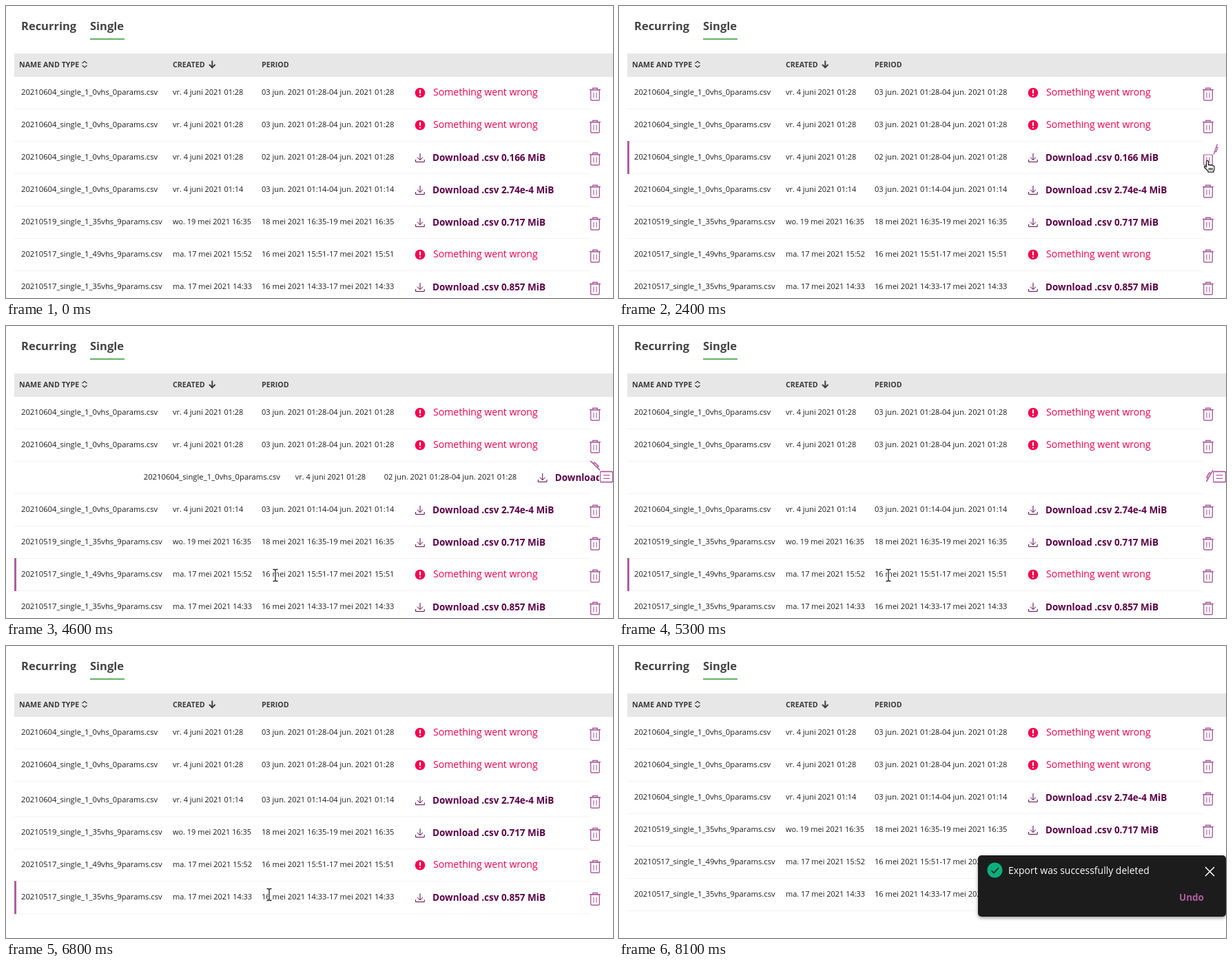
These frames come from a looping animation (881x424 px, 9200 ms). An HTML page:

```html
<!DOCTYPE html>
<html lang="en">
<head>
<meta charset="utf-8">
<title>Exports</title>
<style>
html, body { margin: 0; width: 100%; height: 100%; overflow: hidden; background: #fff; }
svg { display: block; width: 881px; height: 424px; font-family: 'Open Sans', sans-serif; }
.tab { font-size: 16.5px; font-weight: 700; fill: #444; }
.head { font-size: 10.7px; font-weight: 700; fill: #3c3c3c; }
.cell { fill: #1c1c1c; }
.err { font-size: 14.07px; fill: #f0004c; }
.link { fill: #5c0048; stroke: #5c0048; }
.link text { font-size: 13.5px; font-weight: 700; stroke: none; }
.link path { fill: none; stroke-width: 1; }
.link.hover { fill: #ad5f9f; stroke: #ad5f9f; }
.note { font-size: 13.96px; fill: #fff; }
.undo { font-size: 13.5px; font-weight: 700; fill: #ad5f9f; }
.trash { fill: none; stroke: #ad5f9f; stroke-width: 1.4; stroke-linejoin: round; }
.cursor { fill: #fff; stroke: #222; stroke-width: 1.3; stroke-linejoin: round; }
</style>
</head>
<body>
<svg id="stage" viewBox="0 0 881 424"></svg>
<script>
const LOOP = 9200, STEP = 100, ROW = 47, TOP = 103, GONE = 2;
const stage = document.getElementById('stage');

// name, created, period, download size (none = failed)
const rows = [
  ['20210604_single_1_0vhs_0params.csv', 'vr. 4 juni 2021 01:28', '03 jun. 2021 01:28-04 jun. 2021 01:28'],
  ['20210604_single_1_0vhs_0params.csv', 'vr. 4 juni 2021 01:28', '03 jun. 2021 01:28-04 jun. 2021 01:28'],
  ['20210604_single_1_0vhs_0params.csv', 'vr. 4 juni 2021 01:28', '02 jun. 2021 01:28-04 jun. 2021 01:28', '0.166'],
  ['20210604_single_1_0vhs_0params.csv', 'vr. 4 juni 2021 01:14', '03 jun. 2021 01:14-04 jun. 2021 01:14', '2.74e-4'],
  ['20210519_single_1_35vhs_9params.csv', 'wo. 19 mei 2021 16:35', '18 mei 2021 16:35-19 mei 2021 16:35', '0.717'],
  ['20210517_single_1_49vhs_9params.csv', 'ma. 17 mei 2021 15:52', '16 mei 2021 15:51-17 mei 2021 15:51'],
  ['20210517_single_1_35vhs_9params.csv', 'ma. 17 mei 2021 14:33', '16 mei 2021 14:33-17 mei 2021 14:33', '0.857']
];

// pointer path: time, x, y
const path = [
  [0, 560, -40], [100, 572, 8], [500, 640, 150], [900, 700, 228], [1000, 718, 230],
  [1600, 850, 229], [1900, 854, 225], [2600, 854, 225], [3600, 790, 222],
  [3700, 690, 250], [3900, 430, 345], [4000, 400, 356], [4300, 391, 362],
  [5600, 391, 362], [5700, 381.5, 361.5], [6000, 381.5, 361.5], [6100, 382, 361], [7000, 382, 361],
  [7200, 310, 260], [7400, 180, 122], [7500, 140, 86], [7800, 100, -30], [LOOP, 100, -40]
];

const clamp = v => Math.max(0, Math.min(1, v));
const lerp = (a, b, u) => a + (b - a) * u;
const span = (t, a, b) => clamp((t - a) / (b - a));
const easeOut = u => 1 - (1 - u) ** 2;
const easeBoth = u => u * u * (3 - 2 * u);

const text = (x, y, s, cls, size) =>
  `<text x="${x}" y="${y}" class="${cls}"${size ? ` font-size="${size}"` : ''}>${s}</text>`;

const trash = `<g class="trash">
  <path d="M-6.3 .5V14Q-6.3 15.5 -4.8 15.5H4.8Q6.3 15.5 6.3 14V.5"/>
  <path d="M-6.3 .5H6.3" stroke-width="1"/>
  <path d="M-2 4V12M2 4V12" stroke-width="1.1"/>
  <path class="lid" d="M-8 0H8M-3.3 0V-2.2H3.3V0"/>
</g>`;

function status(size) {
  if (!size) return `<circle cx="601" cy="23" r="7.3" fill="#f5004f"/>
    <path d="M601 18.5V24" stroke="#fff" stroke-width="2"/><circle cx="601" cy="26.7" r="1.1" fill="#fff"/>`
    + text(620, 27, 'Something went wrong', 'err');
  return `<g class="link"><path d="M601 17V26.5M597 22.7L601 26.7L605 22.7M594.6 26V29.4H607.2V26"/>`
    + text(619, 28, `Download .csv ${size} MiB`, '') + '</g>';
}

const rowMarkup = ([name, created, period, size]) => `<g class="row">
  <rect x="12" y="46" width="836" height="1" fill="#f2f2f2"/>
  <rect class="bar" x="12" y="-1" width="3" height="48" fill="#ad5f9f"/>
  <g clip-path="url(#open)"><g class="data">
    ${text(22, 26, name, 'cell', 11.25)}${text(242, 26, created, 'cell', 10.95)}${text(371, 26, period, 'cell', 11.1)}
    ${status(size)}
  </g></g>
  <g class="can" transform="translate(855 18.5)">${trash}</g>
</g>`;

const beam = 'M-3.5 -8.5H-1.2L0 -7.5L1.2 -8.5H3.5M0 -7.5V7.5M-3.5 8.5H-1.2L0 7.5L1.2 8.5H3.5';

stage.innerHTML = `
<defs>
  <clipPath id="open"><rect x="0" y="-5" width="861" height="60"/></clipPath>
  <filter id="shadow" x="-10%" y="-20%" width="120%" height="150%">
    <feDropShadow dx="0" dy="2" stdDeviation="2.5" flood-opacity=".4"/>
  </filter>
</defs>
<rect width="881" height="424" fill="#fff"/>
${text(22, 35, 'Recurring', 'tab')}${text(122, 35, 'Single', 'tab')}
<rect x="122" y="47" width="50" height="2" fill="#5fb565"/>
${rows.map(rowMarkup).join('')}
<rect x="12" y="69" width="869" height="34" fill="#e7e7e7"/>
${text(19, 89, 'NAME AND TYPE', 'head')}${text(242, 89, 'CREATED', 'head')}${text(371, 89, 'PERIOD', 'head')}
<g fill="none" stroke="#3c3c3c">
  <path d="M110.5 83.3L114 80.3L117.5 83.3M110.5 86.2L114 89.2L117.5 86.2" stroke-width="1.4"/>
  <path d="M299.3 79.5V89M295 85L299.3 89.3L303.6 85" stroke-width="1.9"/>
</g>
<g id="toast">
  <rect x="521" y="304" width="360" height="89" rx="5" fill="#1c1c1c" filter="url(#shadow)"/>
  <circle cx="545.5" cy="325.5" r="11" fill="#0bb07b"/>
  <path d="M540.5 326L544 329.5L551 322" fill="none" stroke="#1c1c1c" stroke-width="1.6"/>
  ${text(565, 331, 'Export was successfully deleted', 'note')}
  <path d="M851 321L864 334M864 321L851 334" stroke="#fff" stroke-width="1.5"/>
  ${text(813, 370, 'Undo', 'undo')}
</g>
<g id="cursor" class="cursor">
  <path id="arrow" d="M0 0V15.5L3.7 12.2L6.2 18L8.8 16.8L6.3 11.2H11Z" fill="#222" stroke="#fff"/>
  <g id="beam" fill="none">
    <path d="${beam}" stroke="#fff" stroke-width="3"/>
    <path d="${beam}"/>
  </g>
  <path id="hand" d="M-1.5 1Q-1.5 -.5 0 -.5T1.5 1V6Q3.2 4.8 4.3 6.3Q6 5.3 7 6.8Q10 6.3 10 9V11.5Q10 13.5 8.8 15V16.2H1V14.7L-4 9.8Q-5 8.2 -3.6 7.6Q-2.6 7.4 -1.5 9ZM2.5 10V13.5M4.7 10V13.5M6.9 10V13.5"/>
</g>`;

const $ = id => document.getElementById(id);
const show = (el, on) => el.setAttribute('visibility', on ? 'visible' : 'hidden');
const move = (el, x, y) => el.setAttribute('transform', `translate(${x} ${y})`);
const rowEls = [...stage.querySelectorAll('.row')].map(g => {
  const part = name => g.querySelector('.' + name);
  return { g, bar: part('bar'), data: part('data'), link: part('link'), can: part('can'), lid: part('lid') };
});

function pointer(t) {
  const i = Math.max(1, path.findIndex(p => p[0] >= t));
  const [a, b] = [path[i - 1], path[i]];
  const u = span(t, a[0], b[0]);
  return { x: lerp(a[1], b[1], u), y: lerp(a[2], b[2], u) };
}

const collapse = t => ROW * easeBoth(span(t, 6050, 6970));
const rowTop = (i, t) => TOP + ROW * i - (i > GONE ? collapse(t) : 0);

function rowAt(y, t) {
  for (let i = rows.length - 1; i >= 0; i--)
    if (y >= rowTop(i, t)) return y < rowTop(i, t) + ROW ? i : -1;
  return -1;
}

const overLink = (x, i) => i >= 0 && rows[i][3] && x > 593 && x < 784;

function shapeAt({ x, y }, i, t) {
  if (y > 69 && y < TOP && x < 310) return 'hand';
  if (i < 0) return 'arrow';
  if ((x > 846 && x < 864) || overLink(x, i)) return 'hand';
  const overText = x < 565 || (x > 619 && x < 773);
  return overText && Math.abs(y - rowTop(i, t) - 22) < 10 ? 'beam' : 'arrow';
}

// The lid opens, the bin tips over to face the row, then the lid shuts.
function drawBin(t) {
  const { can, lid } = rowEls[GONE];
  const tip = span(t, 2600, 3800);
  const open = 110 * easeOut(span(t, 1750, 2400)) + 53 * tip - 163 * span(t, 4410, 5500);
  can.setAttribute('transform',
    `translate(${lerp(855, 862, tip)} ${lerp(18.5, 22, tip)}) rotate(${-90 * tip}) scale(${lerp(1, 1.2, tip)})`);
  lid.setAttribute('transform', `rotate(${open} 8 0)`);
}

function draw(t) {
  const p = pointer(t);
  const over = rowAt(p.y, t);
  const before = Math.max(0, t - STEP);
  const lit = rowAt(pointer(before).y, before);
  const shape = shapeAt(p, over, t);

  rowEls.forEach((r, i) => {
    move(r.g, 0, rowTop(i, t));
    show(r.bar, i === lit);
    if (r.link) r.link.classList.toggle('hover', i === over && overLink(p.x, i));
  });
  rowEls[GONE].g.setAttribute('display', t < 6100 ? 'inline' : 'none');
  move(rowEls[GONE].data, 840 * span(t, 4140, 5140) ** 2, 0);
  drawBin(t);

  move($('toast'), 375 * (1 - easeOut(span(t, 7600, 8100))), 0);
  show($('toast'), t > 7600);

  move($('cursor'), p.x, p.y);
  for (const id of ['arrow', 'beam', 'hand']) show($(id), id === shape);
}

const start = performance.now();
function tick() {
  const t = (performance.now() - start) % LOOP;
  draw(Math.floor(t / STEP) * STEP);
  requestAnimationFrame(tick);
}
tick();
</script>
</body>
</html>
```
